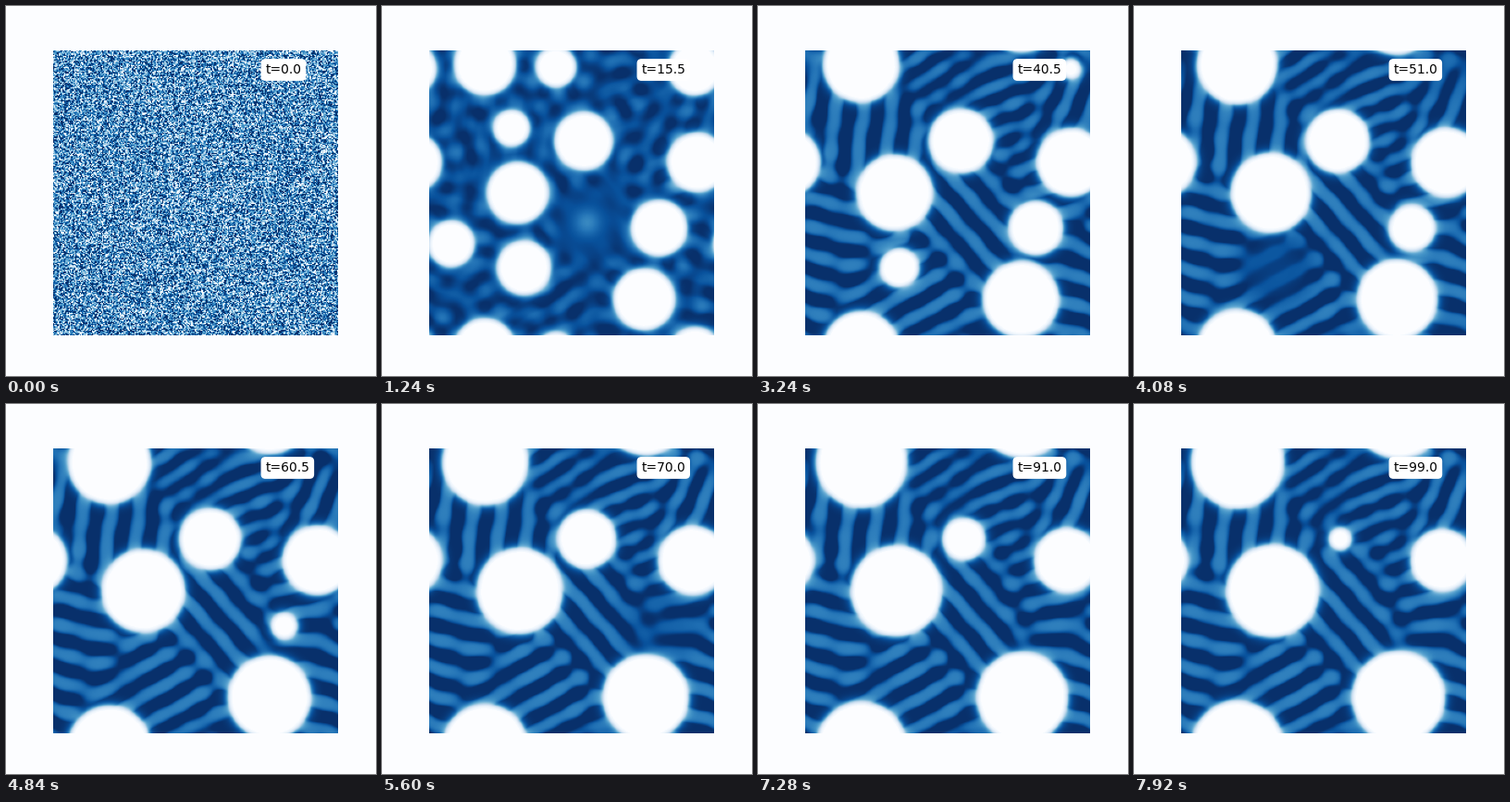
Animation of 400 by 400 pixels, one loop 7960 ms. Source, as a matplotlib script:

```python
import numpy as np
import matplotlib.pyplot as plt
from matplotlib.animation import FuncAnimation

SIZE, LEFT, TOP, SPAN, N = 400, 51, 48, 308, 256
FRAMES, INTERVAL, DT = 199, 40, 0.5
PAPER = "#fcfdff"
NEVER = 1e9

# Droplets: x, y, sideways drift over the loop, time of collapse
DROPS = [
    (111, 63, 1, NEVER), (146, 202, 4, NEVER), (283, 317, 3, NEVER),
    (342, 169, -9, 140), (217, 146, 6, 100), (299, 240, 3, 62),
    (154, 283, -3, 46), (338, 68, 0, 41), (75, 257, 0, 26),
    (188, 66, 0, 20.8), (140, 132, 0, 19), (222, 234, 0, 15),
]
# Wave patches: a point on a crest, crest angle, wavelength
PATCHES = [
    (80, 260, 14, 30), (150, 300, -30, 28), (127, 130, 97, 30),
    (207, 75, -33, 23), (262, 98, -20, 24), (345, 108, -65, 25),
    (228, 227, 48, 29), (325, 209, -15, 29), (340, 275, 12, 31),
]

rng = np.random.default_rng(7)
axis = (np.arange(N) + 0.5) * SPAN / N
X, Y = np.meshgrid(axis + LEFT, axis + TOP)
freq = np.fft.fftfreq(N, SPAN / N)
K = np.hypot(freq[:, None], freq[None, :])


def smooth(t, a, b):
    s = np.clip((t - a) / (b - a), 0, 1)
    return s * s * (3 - 2 * s)


def wrap(d):
    return (d + SPAN / 2) % SPAN - SPAN / 2


def distance(x, y):
    """Distance to a point on the periodic square."""
    return np.hypot(wrap(X - x), wrap(Y - y))


def filtered(field, response):
    out = np.fft.ifft2(np.fft.fft2(field) * response).real
    return (out - out.mean()) / out.std()


def radius(t, end):
    """Droplets ripen together, then shrink towards their collapse."""
    return 16.8 * t**0.23 * np.cbrt(max(0, 1 - t / end))


def make_waves(ripple):
    total = weights = 0
    for x, y, angle, length in PATCHES:
        a = np.radians(angle)
        across = (Y - y) * np.cos(a) - (X - x) * np.sin(a)
        w = np.exp(-((X - x) ** 2 + (Y - y) ** 2) / (2 * 30**2)) + 1e-9
        total = total + w * np.cos(2 * np.pi * across / length)
        weights = weights + w
    band = np.exp(-((K - 1 / 28) / 0.012) ** 2)
    return np.tanh(filtered(total / weights + 0.12 * ripple, band))


def make_seeds():
    """Small early droplets in the gaps, gone before the big ones settle."""
    seeds = []
    taken = [(x, y, 26) for x, y, *_ in DROPS]
    for x, y in rng.uniform((LEFT, TOP), (LEFT + SPAN, TOP + SPAN), (400, 2)):
        gap = min(np.hypot(wrap(x - px), wrap(y - py)) - room
                  for px, py, room in taken)
        if gap > 8:
            seeds.append((x, y, 0, min(2.5 + gap / 3, 12)))
            taken.append((x, y, 14))
    return seeds


noise = rng.normal(0.62, 0.45, (N, N))
ripple = filtered(noise, np.exp(-((K - 1 / 27) / 0.008) ** 2))
waves = make_waves(ripple)
droplets = DROPS + make_seeds()


def field(t):
    if t == 0:
        return noise
    edge = np.full((N, N), 1e3)
    calm = np.ones((N, N))
    glow = np.zeros((N, N))
    for x, y, drift, end in droplets:
        age = t - end
        if age < 0:
            r = radius(t, end)
            dist = distance(x + drift * t / (FRAMES * DT), y)
            edge = np.minimum(edge, dist - r + 2 * max(0, 4 - r))
        elif age < 18 and end > 12:
            dist = distance(x, y)
            calm *= 1 - np.exp(-(dist / 45) ** 4) * (1 - smooth(age, 0, 16))
            glow += 0.32 * np.exp(-age / 1.8 - (dist / 15) ** 2)

    # The waves swap crests and troughs at every step
    flip = np.cos(2 * np.pi * t)
    grown = smooth(t, 10, 28)
    pattern = 0.075 * (1 - grown) * ripple + 0.22 * grown * waves
    sea = 0.91 - flip * calm * pattern
    sea = np.minimum(sea, 1) - glow
    sea -= 0.13 * np.exp(-(np.maximum(edge - 1, 0) / 8) ** 2)
    inside = 1 / (1 + np.exp(np.clip((edge - 2) / 1.4, -30, 30)))
    value = sea * (1 - inside)

    if t < 4:
        sigma = 1.4 + 2 * t
        rough = filtered(noise, np.exp(-2 * (np.pi * K * sigma) ** 2))
        mix = smooth(t, 0, 4)
        value = mix * value + (1 - mix) * np.clip(0.6 - 0.4 * rough, 0, 1)
    return np.clip(value, 0, 1)


fig = plt.figure(figsize=(4, 4), dpi=100, facecolor=PAPER)
ax = fig.add_axes([LEFT / SIZE, (SIZE - TOP - SPAN) / SIZE, SPAN / SIZE, SPAN / SIZE])
ax.axis("off")
cmap = plt.get_cmap("Blues").copy()
cmap.set_under(PAPER)
image = ax.imshow(noise, cmap=cmap, vmin=0.02, vmax=1, aspect="auto",
                  interpolation="antialiased")
label = fig.text(280.4 / SIZE, 1 - 73 / SIZE, "t=0.0", fontsize=10,
                 family="DejaVu Sans", color="black", va="baseline",
                 bbox=dict(boxstyle="round,pad=0.3", facecolor="white",
                           edgecolor="white", linewidth=1))


def update(i):
    t = i * DT
    image.set_data(field(t))
    label.set_text(f"t={t:.1f}")
    return image, label


anim = FuncAnimation(fig, update, frames=FRAMES, interval=INTERVAL,
                     repeat=True, repeat_delay=0)
plt.show()
```
